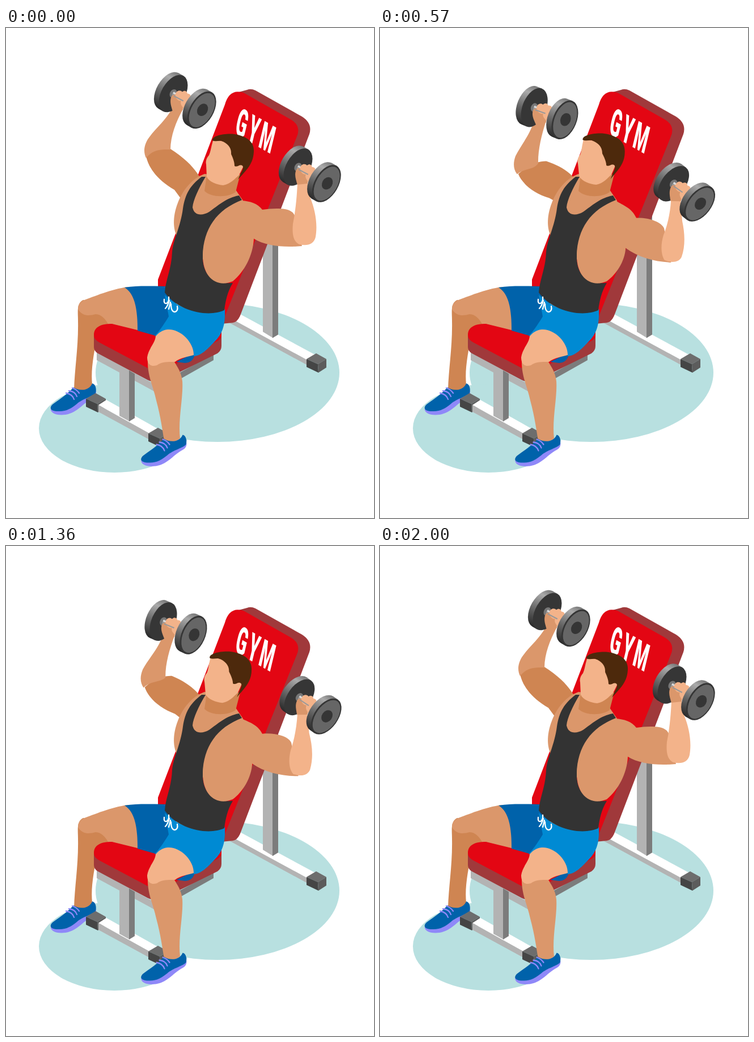
Animation, 649 px wide and 863 px high, one loop 2.43 s. Source, as an HTML page:

```html
<!DOCTYPE html>
<html lang="en">
<head>
<meta charset="utf-8">
<title>Shoulder press</title>
<style>
html, body { margin: 0; width: 100%; height: 100%; overflow: hidden; background: #fff; }
svg { display: block; width: 100%; height: 100%; }
.sign { font: 900 62px Roboto, Arial, sans-serif; letter-spacing: 8px; fill: #fff; }
.red { fill: #e30613; } .wine { fill: #a0393b; }
.pale { fill: #b3b3b3; } .grey { fill: #7c7c7c; } .white { fill: #fff; }
.skin { fill: #db976b; } .tan { fill: #cf8552; } .light { fill: #f3b38a; }
.navy { fill: #0062aa; } .blue { fill: #008ad3; } .lilac { fill: #8f88f8; }
.black { fill: #333; } .hair { fill: #4d290c; }
.line { fill: none; stroke: #fff; stroke-width: 2.3; stroke-linecap: round; }
</style>
</head>
<body>
<svg viewBox="0 0 649 863">
  <defs>
    <linearGradient id="rim" x2="0" y2="1">
      <stop stop-color="#777"/><stop offset=".2" stop-color="#aaa"/>
      <stop offset=".6" stop-color="#666"/><stop offset="1" stop-color="#292929"/>
    </linearGradient>
    <path id="edge" d="M5,-36 H-5 A20.8,36 0 0 0 -5,36 H5Z" fill="url(#rim)"/>
    <g id="back">
      <use href="#edge"/>
      <ellipse cx="5" rx="20.8" ry="36" fill="#363636"/>
      <ellipse cx="5" rx="6" ry="8" fill="#777"/>
      <path d="M4,-4 H45 V4 H4Z" fill="#999"/>
      <path d="M4,-3 H45 V0 H4Z" fill="#ddd"/>
    </g>
    <g id="front">
      <use href="#edge"/>
      <ellipse cx="5" rx="20.8" ry="36" fill="#353535"/>
      <ellipse cx="5.5" rx="18.6" ry="33" fill="#666"/>
      <ellipse cx="6" cy="-1" rx="9" ry="11.5" fill="#353535"/>
    </g>
    <g id="bell">
      <use href="#back" transform="rotate(30) translate(-29)"/>
      <path class="skin" d="M-24,-7 C-28,2 -24,11 -22,19 L-4,17 C-1,8 -4,-4 -10,-8 C-15,-11 -21,-11 -24,-7Z"/>
      <path class="light" d="M-17,-10 C-16,-18 -8,-19 -5,-15 C0,-19 4,-15 4,-12 C9,-12 11,-8 9,-5 L3,8 L-3,14 C-6,9 -9,6 -7,1 C-13,1 -17,-4 -17,-10Z"/>
      <path d="M-20,-8 L-3,1" stroke="#999" stroke-width="2"/>
      <use href="#front" transform="rotate(30) translate(29)"/>
    </g>
    <g id="cube">
      <path fill="#6d6d6d" d="M0,10 L17,0 L35,10 L20,19Z"/>
      <path fill="#454545" d="M0,10 L20,19 L21,34 L0,24Z"/>
      <path fill="#5c5c5c" d="M20,19 L35,10 L35,25 L21,34Z"/>
    </g>
    <g id="shoe">
      <path class="lilac" d="M79,669 C77,679 90,683 105,681 C127,677 134,662 153,652 C159,648 160,643 158,637Z"/>
      <path class="navy" d="M119,633 C108,645 96,653 82,663 C75,670 80,675 91,675 C106,676 115,670 125,662 C135,653 153,649 158,643 C160,636 158,627 152,626 C147,639 130,640 119,633Z"/>
      <path class="line" style="stroke:#8f88f8" d="M106,643 Q117,645 120,654 M111,639 Q122,640 125,649 M117,634 Q124,636 129,643"/>
    </g>
  </defs>

  <g fill="#b8e0e0">
    <ellipse cx="373" cy="607" rx="215" ry="122"/>
    <ellipse cx="191" cy="705" rx="133" ry="78"/>
  </g>

  <path class="white" d="M400,497 L548,577 L530,586 L390,508Z"/>
  <path class="pale" d="M390,508 L530,584 V593 L390,517Z"/>
  <path class="pale" d="M453,340 H471 V546 L453,535Z"/>
  <path class="grey" d="M470,330 H480 V540 L470,546Z"/>
  <use href="#cube" x="530" y="573"/>

  <path class="wine" d="M410,113 L425,109 Q432,106 440,110 L522,156 Q541,168 535,187 L414,504 Q409,518 400,519 L380,521Z"/>
  <path class="red" d="M268,443 L386,135 Q394,106 419,114 L502,161 Q521,172 513,191 L381,520 L268,470Z"/>
  <text class="sign" transform="matrix(.43 .245 -.25 1.04 402 185)">GYM</text>

  <path class="tan" d="M136,479 C124,485 127,500 127,516 C128,560 121,600 120,637 C130,642 147,640 152,628 C149,600 156,570 161,540 L200,525 L190,490Z"/>
  <path class="skin" d="M215,456 C185,460 155,473 136,480 C127,486 126,492 128,497 C136,508 147,507 158,504 C167,504 174,511 180,521 L245,540 L250,470Z"/>

  <path class="pale" d="M160,571 L265,629 V642 L160,585Z"/>
  <path class="grey" d="M265,630 L366,574 V585 L265,642Z"/>
  <use href="#shoe"/>
  <use href="#cube" x="141" y="643"/>
  <path class="white" d="M177,655 L268,706 L253,716 L163,664Z"/>
  <path class="pale" d="M163,664 L253,714 V725 L163,676Z"/>
  <path class="pale" d="M200,594 L218,604 V693 L200,683Z"/>
  <path class="grey" d="M217,603 L227,609 V687 L217,693Z"/>
  <path class="wine" d="M155,540 V562 Q155,569 162,573 L250,620 Q265,627 280,619 L373,573 Q380,568 380,560 V535Z"/>
  <path class="red" d="M155,541 C155,526 168,521 187,521 L240,534 L380,520 V541 Q380,547 373,551 L290,597 Q270,607 250,599 L165,554 Q155,549 155,541Z"/>
  <use href="#cube" x="251" y="704"/>

  <path class="navy" d="M209,457 C235,453 260,455 290,455 L305,500 L264,542 L232,533 C232,500 229,469 209,457Z"/>
  <path class="navy" d="M300,588 L331,573 L332,579 Q327,590 316,590Z"/>
  <path class="blue" d="M280,470 C310,500 360,508 386,495 C387,520 383,535 372,548 C355,566 345,577 331,578 C331,548 303,527 262,543 C272,532 281,518 287,508Z"/>
  <path class="skin" d="M250,585 C249,612 260,632 265,656 C273,685 276,710 279,727 Q294,733 307,723 C303,690 313,650 311,622 C309,605 302,597 297,588Z"/>
  <path class="light" d="M264,543 C263,555 251,565 249,580 C249,594 257,597 266,594 C276,587 286,588 298,588 C308,580 322,579 331,576 C332,554 307,529 285,531 C275,532 269,537 264,543Z"/>
  <use href="#shoe" x="159.5" y="90.5"/>

  <path class="tan" id="upperL"/>
  <path class="skin" id="foreL"/>
  <use href="#bell" id="bellL"/>

  <path class="skin" d="M350,257 C328,265 312,285 303,308 C293,334 295,355 302,368 L330,410 L400,400 L418,304 L405,285 L400,262Z"/>
  <path class="tan" d="M354,260 L350,287 C363,300 393,298 405,289 L413,258Z"/>
  <path class="black" d="M345,262 L352,262 C340,282 330,303 329,316 C332,331 346,331 358,324 C374,313 388,299 411,295 L416,303 C380,315 347,360 347,405 C348,435 365,452 400,449 C390,465 387,482 385,497 C360,509 307,502 280,466 C281,445 292,424 293,395 C295,372 308,350 312,318 C316,292 325,277 345,262Z"/>
  <g class="line">
    <path d="M279,478 Q278,486 283,485 Q288,482 287,474 M288,480 Q285,490 281,494"/>
    <path d="M290,483 L287,495 M291,486 Q291,500 298,500 Q304,498 302,490"/>
  </g>
  <g id="head">
    <path class="light" d="M366,196 C362,207 361,218 358,224 Q351,232 353,240 L354,262 C358,271 372,276 383,277 C397,274 403,266 411,259 L419,243 L398,203Z"/>
    <path class="hair" d="M364,198 C363,190 385,185 403,187 C428,191 438,203 437,218 C436,240 424,250 409,267 L414,256 C419,248 419,243 416,242 C411,240 408,246 403,243 C403,235 400,229 397,222 C398,211 391,203 380,199 C375,198 370,201 364,198Z"/>
  </g>

  <path class="skin" id="upperR"/>
  <path class="light" id="foreR"/>
  <use href="#bell" id="bellR"/>
</svg>
<script>
// Each limb: raised outline, lowered outline
const limbs = {
  upperL: ["M247,226 C252,248 268,268 297,285 L308,300 L345,268 C335,250 320,232 290,213 C272,211 255,215 247,226Z",
           "M241,284 C250,298 275,312 300,312 L310,310 L345,268 C335,257 315,251 296,253 C285,255 270,262 241,284Z"],
  foreL: ["M293,142 C280,165 262,178 250,196 C242,210 243,220 247,229 C260,212 278,214 290,214 C290,190 300,165 312,143Z",
          "M259,186 C255,215 242,235 235,255 C232,270 236,281 243,286 C255,280 268,287 275,264 C274,240 277,215 281,188Z"],
  upperR: ["M416,304 C430,305 444,309 452,320 C466,318 480,317 492,319 C502,321 507,325 509,330 L522,384 C490,387 458,384 437,371 C436,400 420,430 400,446 C372,458 347,440 347,400 C348,355 372,318 416,304Z",
           "M416,304 C428,320 443,322 452,347 C462,348 470,351 479,358 C487,363 491,367 494,372 L506,438 C482,434 452,421 430,402 C428,420 415,437 400,446 C372,458 347,440 347,400 C348,355 372,318 416,304Z"],
  foreR: ["M514,272 C513,300 510,325 506,345 C504,365 508,377 517,381 C530,384 543,382 546,368 C550,345 545,320 537,300 L532,272Z",
          "M508,330 C506,350 500,365 490,382 C481,400 481,420 484,433 C495,440 508,441 515,434 C525,415 526,395 525,375 L524,330Z"]
};
const el = id => document.getElementById(id);
const lerp = (a, b, p) => a + (b - a) * p;
const number = /[\d.]+/g;

function morph(from, to, p) {
  const ends = to.match(number);
  let i = 0;
  return from.replace(number, n => lerp(+n, +ends[i++], p).toFixed(2));
}

const ease = (k, start, length) => {
  const x = Math.min(1, Math.max(0, (k - start) / length));
  return x * x * (3 - 2 * x);
};

// How far the weights are lowered, 0 to 1, at step k
const lowered = k => ease(k, 0, 5) - ease(k, 6, 4.2) + ease(k, 16, 7) - ease(k, 23, 4.2);

function pose(p) {
  const bow = 4 * p * (1 - p);
  const shift = { L: [-3 * bow, -2 * bow], R: [2.5 * bow, 0] };
  for (const id in limbs) {
    const limb = el(id);
    limb.setAttribute("d", morph(...limbs[id], p));
    if (id.startsWith("fore")) limb.setAttribute("transform", `translate(${shift[id.slice(-1)]})`);
  }
  const bell = (side, x, y, turn) => el("bell" + side).setAttribute("transform",
    `translate(${x + shift[side][0]} ${y + shift[side][1]}) rotate(${turn * p})`);
  bell("L", lerp(315.8, 281.5, p), lerp(127.5, 171.5, p), -15);
  bell("R", lerp(535.8, 532.8, p), lerp(257, 316.5, p), 14);
  el("head").setAttribute("transform", `matrix(1 0 ${0.11 * p} 1 ${-33.8 * p} ${-2 * p})`);
}

const startTime = performance.now();
function draw(now) {
  const t = Math.max(0, now - startTime) % 2430;
  // 14 steps a second, on 10 ms ticks
  pose(lowered(Math.floor((Math.floor(t / 10) * 10 + 5) * 0.014)));
  requestAnimationFrame(draw);
}
draw(startTime);
</script>
</body>
</html>
```
